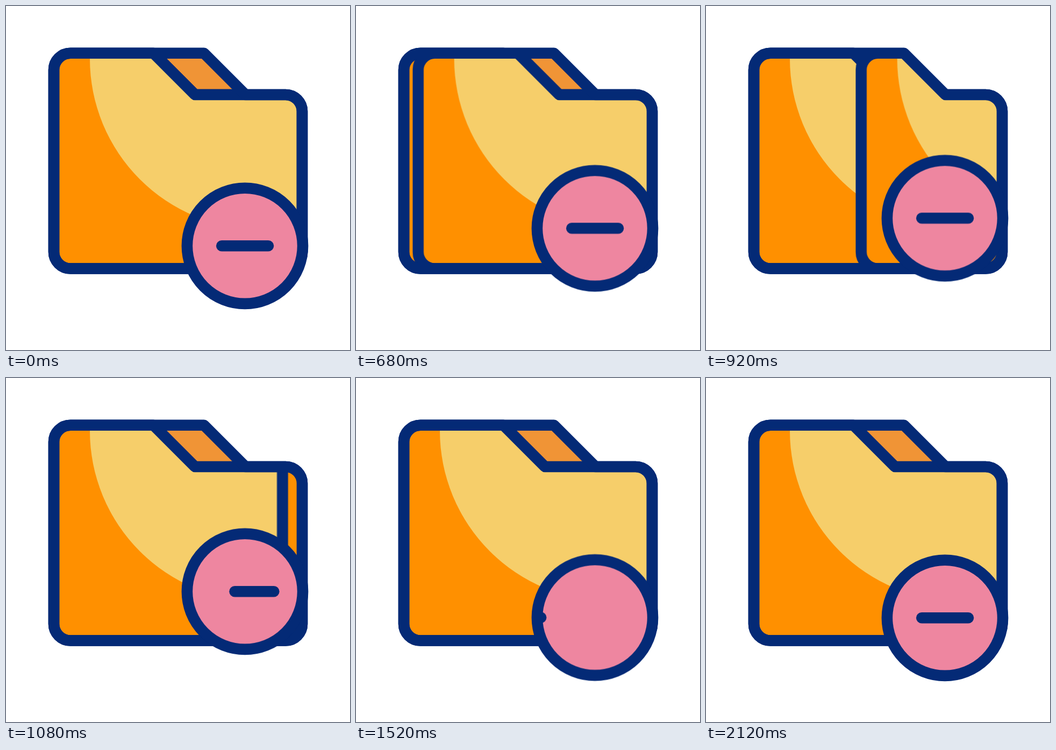
Animation of 640x640 px, one loop 2400 ms. Source, as an HTML page without scripts:

```html
<!DOCTYPE html>
<html lang="en">
<head>
<meta charset="utf-8">
<title>Remove folder</title>
<style>
  html, body { margin: 0; width: 100%; height: 100%; overflow: hidden; background: #fff; }
  svg { display: block; width: 100%; height: 100%; }
  .line { fill: none; stroke: #042a76; stroke-width: 20.6; stroke-linecap: round; stroke-linejoin: round; }
  .sliding, .badge, .minus { animation: 2.4s infinite both; }
  .sliding { animation-name: slide; }
  .badge { animation-name: lift; }
  .minus { animation-name: sweep; d: path("M401.3 446.3H488"); }

  @keyframes slide {
    0%, 18.33% { transform: translateX(0); animation-timing-function: cubic-bezier(.709, 0, .291, 1); }
    61.67%, 100% { transform: translateX(530px); }
  }
  @keyframes lift {
    0%, 15.67% { transform: translateY(0); animation-timing-function: cubic-bezier(.333, 0, .667, 1); }
    37.17% { transform: translateY(-51.5px); animation-timing-function: linear; }
    40.83% { transform: translateY(-51.5px); animation-timing-function: cubic-bezier(.5, 0, .3, 1); }
    66.67%, 100% { transform: translateY(0); }
  }
  /* Shrinks into the right rim, then slides in again from the left. */
  @keyframes sweep {
    0%, 40.25% { d: path("M401.3 446.3H488"); animation-timing-function: cubic-bezier(.333, 0, .667, 1); }
    59.1% { d: path("M552 446.3H552.1"); animation-timing-function: step-end; }
    59.17% { d: path("M240.3 446.3H327"); animation-timing-function: cubic-bezier(.33, 0, .3, 1); }
    84.6%, 100% { d: path("M401.3 446.3H488"); }
  }
</style>
</head>
<body>
<svg viewBox="0 0 640 640">
  <defs>
    <path id="back" d="M120 87.8H368.3L445.5 165H520a31 31 0 0 1 31 31V457.5a31 31 0 0 1-31 31H120a31 31 0 0 1-31-31V118.8a31 31 0 0 1 31-31Z"/>
    <path id="front" d="M120 87.8H274.3L351.5 165H520a31 31 0 0 1 31 31V457.5a31 31 0 0 1-31 31H120a31 31 0 0 1-31-31V118.8a31 31 0 0 1 31-31Z"/>
    <clipPath id="inBack"><use href="#back"/></clipPath>
    <clipPath id="inFront"><use href="#front"/></clipPath>
    <clipPath id="inBadge"><circle cx="444.5" cy="446.3" r="108"/></clipPath>
    <g id="folder">
      <use href="#front" fill="#ff9000"/>
      <circle cx="473.3" cy="98" r="317.3" fill="#f6ce6a" clip-path="url(#inFront)"/>
      <use href="#front" class="line"/>
    </g>
  </defs>

  <use href="#back" fill="#f09436"/>
  <use href="#folder"/>
  <g clip-path="url(#inBack)">
    <g class="sliding"><use href="#folder"/></g>
  </g>
  <use href="#back" class="line"/>

  <g class="badge">
    <circle cx="444.5" cy="446.3" r="107.6" fill="#ee86a0"/>
    <g clip-path="url(#inBadge)"><path class="line minus" d="M401.3 446.3H488"/></g>
    <circle class="line" cx="444.5" cy="446.3" r="107.6"/>
  </g>
</svg>
</body>
</html>
```
